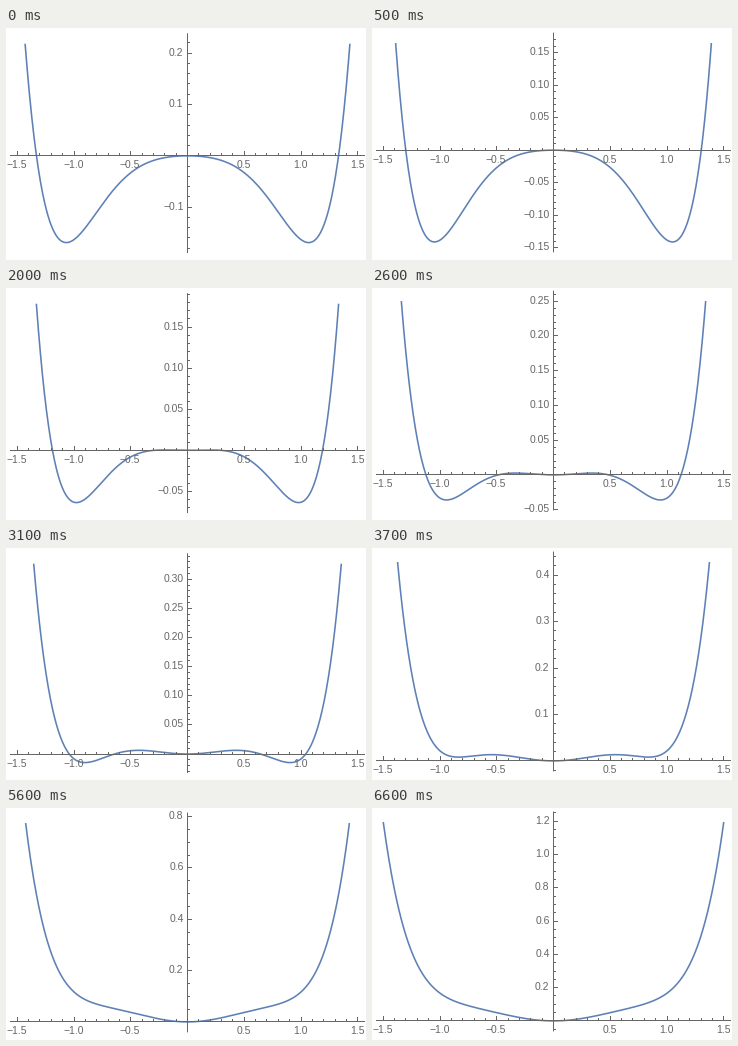
Animation of 360x232 px, one loop 6.7 s. Source, as a matplotlib script:

```python
import numpy as np
import matplotlib.pyplot as plt
from matplotlib.animation import FuncAnimation

W, H = 360, 232
FRAMES, INTERVAL = 67, 100
BLUE = (0.368, 0.507, 0.710)
GRAY = "0.4"
CX, XS = 181.5, 113.5             # x origin and pixels per unit
BOX_W = 354
BOX_H = BOX_W / 1.618034
PAD = BOX_H / 22                  # 5% of the data height on each side
DATA_H = BOX_H - 2 * PAD
MID = 115.15                      # vertical centre of plot plus labels
HALF = 5.5                        # half the height of a tick label

# Upper plot limit as a smooth function of the quadratic coefficient
TOP = np.polyfit([-0.16, -0.05, 0.04, 0.15, 0.28, 0.40],
                 [0.2185, 0.1376, 0.1786, 0.3268, 0.550, 0.775], 5)

fig = plt.figure(figsize=(W / 72, H / 72), dpi=72, facecolor="white")
ax = fig.add_axes([0, 0, 1, 1])


def energy(x, a):
    return a * x**2 / 2 - x**4 / 4 + x**6 / 6


def top_limit(a):
    if a > 0.435:
        return energy(1.5, a)
    if a > 0.40:
        return 0.775 + 1.9 * (a - 0.40)
    return np.polyval(TOP, a)


def snap(v):
    return np.floor(v) + 0.5


def label(x, y, value, digits, align):
    text = f"{value:.{digits}f}".replace("-", "\u2212")
    ax.text(x, y + 2.7, text, ha=align, va="baseline", color=GRAY,
            fontsize=10.4, family="Liberation Sans", zorder=3)


def stroke(xs, ys):
    ax.plot(xs, ys, color=GRAY, lw=1, solid_capstyle="projecting",
            snap=False, zorder=2)


def tick_steps(span):
    for major, minor, digits in ((0.05, 0.01, 2), (0.1, 0.02, 1)):
        if span / major <= 8:
            return major, minor, digits
    return 0.2, 0.05, 1


def ticks(lo, hi, major, minor):
    """Yield (value, is_major) for each nonzero tick in the range."""
    every = round(major / minor)
    for k in range(int(np.ceil(lo / minor)), int(np.floor(hi / minor)) + 1):
        if k:
            yield k * minor, k % every == 0


def draw(i):
    ax.clear()
    ax.set(xlim=(0, W), ylim=(H, 0))
    ax.axis("off")

    a = -0.16 + 0.01 * i
    hi = top_limit(a)
    lo = energy(np.linspace(0, 1.5, 1501), a).min()
    scale = DATA_H / (hi - lo)
    margin = PAD / scale
    major, minor, digits = tick_steps(hi - lo + 2 * margin)
    y_ticks = list(ticks(lo - margin, hi + margin, major, minor))

    # Centre the box together with any labels sticking out of it
    box_top, box_bottom = -hi * scale - PAD, -lo * scale + PAD
    marks = [-v * scale for v, big in y_ticks if big]
    above = min([box_top] + [m - HALF for m in marks])
    below = max([box_bottom, 13.3] + [m + HALF for m in marks])
    y0 = MID - (above + below) / 2
    axis_y = snap(y0)

    outer = np.linspace(1.1, 1.5, 801)
    end = np.interp(hi, energy(outer, a), outer)
    x = np.linspace(-end, end, 601)
    ax.plot(CX + XS * x, y0 - scale * energy(x, a), color=BLUE, lw=1.6,
            solid_capstyle="butt", solid_joinstyle="round", zorder=1)

    stroke([CX - BOX_W / 2, CX + BOX_W / 2], [axis_y, axis_y])
    stroke([CX, CX], [y0 + box_top, y0 + box_bottom])

    for v, big in ticks(-1.56, 1.56, 0.5, 0.1):
        px = snap(CX + XS * v)
        stroke([px, px], [axis_y, axis_y - (4 if big else 2)])
        if big:
            label(CX + XS * v - 0.7, axis_y + 10, v, 1, "center")
    for v, big in y_ticks:
        py = snap(y0 - scale * v)
        stroke([CX, CX + (4 if big else 2)], [py, py])
        if big:
            label(CX - 4, py, v, digits, "right")


anim = FuncAnimation(fig, draw, frames=FRAMES, interval=INTERVAL,
                     init_func=lambda: None, repeat=True)
plt.show()
```
